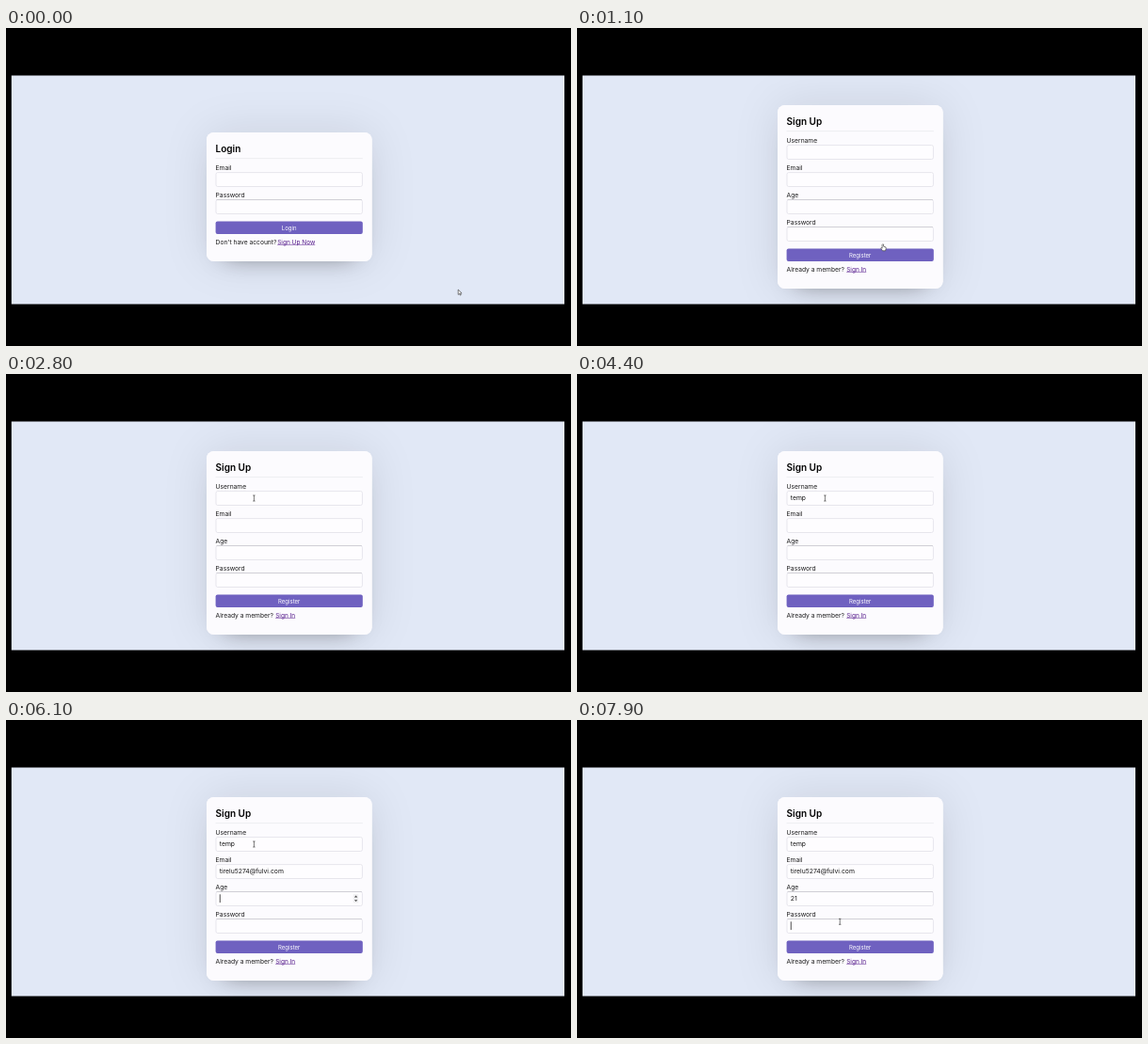
Write an HTML page with a canvas that moves like this. It is 600x338 px and loops after 8 s.

```html
<!DOCTYPE html>
<html lang="en">
<head>
<meta charset="utf-8">
<title>Sign up form</title>
<style>
  html, body { margin: 0; width: 100%; height: 100%; overflow: hidden; background: #000; }
  canvas { display: block; width: 600px; height: 338px; }
</style>
</head>
<body>
<canvas id="stage"></canvas>
<script>
const W = 600, H = 338, LOOP = 8000, TICK = 100;
const FONT = 'Inter, "Open Sans", sans-serif';
const LEFT = 222.6, INNER = 156.2, PITCH = 29;
const EMAIL = 'tirelu5274@fulvi.com';

const LOGIN = {
  top: 111, height: 137, title: 'Login', fields: ['Email', 'Password'],
  button: 'Login', note: "Don't have account?", link: 'Sign Up Now', linkX: 288.2, linkEnd: 327
};
const SIGNUP = {
  top: 82, height: 195, title: 'Sign Up', fields: ['Username', 'Email', 'Age', 'Password'],
  button: 'Register', note: 'Already a member?', link: 'Sign In', linkX: 286.2, linkEnd: 307
};

// Pointer stops: time, x, y of the hot spot
const PATH = [
  [0, 480.2, 278], [200, 391, 283], [400, 391, 283], [1000, 324.6, 229.8],
  [1200, 324.6, 229.8], [2100, 263.4, 132], [6900, 263.4, 132], [7700, 279.2, 214.3]
];

// Focus changes: time, field index
const FOCUS = [[2200, 0], [3900, 1], [5000, 2], [7700, 3]];
const CARET_OFF = [[2800, 3100], [3800, 3900], [4400, 4700], [5200, 5500], [5800, 6100], [6400, 6600], [7200, 7500]];

const canvas = document.getElementById('stage');
const ctx = canvas.getContext('2d');
const dpr = window.devicePixelRatio || 1;
canvas.width = W * dpr;
canvas.height = H * dpr;
ctx.scale(dpr, dpr);

const pageAt = t => t < 1100 ? LOGIN : SIGNUP;
const inputTop = (page, i) => page.top + 42.2 + PITCH * i;
const extra = page => PITCH * (page.fields.length - 2);
const typed = (text, t, start) =>
  text.slice(0, Math.max(0, Math.floor((t - start) / TICK) + 1));

function valuesAt(t) {
  const name = t < 3100 ? '' : typed('temp', t, 3000);
  return [name, t < 4700 ? '' : EMAIL, typed('21', t, 6600), ''];
}

function focusAt(t) {
  let field = -1;
  for (const [start, i] of FOCUS) if (t >= start) field = i;
  return field;
}

function pointerAt(t) {
  let i = PATH.length - 1;
  while (t < PATH[i][0]) i--;
  const a = PATH[i], b = PATH[i + 1] || a;
  const p = b === a ? 0 : (t - a[0]) / (b[0] - a[0]);
  const e = p * p * (3 - 2 * p);
  return { x: a[1] + (b[1] - a[1]) * e, y: a[2] + (b[2] - a[2]) * e };
}

function text(str, x, y, size, color, weight = 400, align = 'left') {
  ctx.font = `${weight} ${size}px ${FONT}`;
  ctx.fillStyle = color;
  ctx.textAlign = align;
  ctx.fillText(str, x, y);
}

function box(x, y, w, h, r, color) {
  ctx.beginPath();
  ctx.roundRect(x, y, w, h, r);
  ctx.fillStyle = color;
  ctx.fill();
}

function rect(x, y, w, h, color) {
  ctx.fillStyle = color;
  ctx.fillRect(x, y, w, h);
}

function shadow(page, spread, dy, blur, color) {
  ctx.save();
  ctx.shadowColor = color;
  ctx.shadowBlur = blur * dpr;
  ctx.shadowOffsetY = dy * dpr;
  box(213 + spread, page.top + spread, 175.6 - 2 * spread, page.height - 2 * spread, 7.8, '#fcfbfe');
  ctx.restore();
}

function drawInput(y) {
  ctx.beginPath();
  ctx.roundRect(LEFT + 0.4, y + 0.4, INNER - 0.8, 14.9, 1.8);
  ctx.fillStyle = '#fefdff';
  ctx.fill();
  ctx.lineWidth = 0.7;
  ctx.strokeStyle = '#dfdde5';
  ctx.stroke();
  if (y > 180) rect(LEFT + 1, y - 0.2, INNER - 2, 0.9, '#cfcdd4');
}

function drawSpinner(y) {
  rect(368.8, y + 3, 5.4, 9.2, '#efeff1');
  ctx.fillStyle = '#444';
  for (const s of [-1, 1]) {
    const mid = y + 7.6 + s * 1.4;
    ctx.beginPath();
    ctx.moveTo(369.9, mid);
    ctx.lineTo(373.3, mid);
    ctx.lineTo(371.6, mid + s * 1.9);
    ctx.fill();
  }
}

function drawCard(page, t) {
  shadow(page, 0, 0, 50, 'rgba(0,0,0,.1)');
  shadow(page, 18.7, 12.5, 25, 'rgba(0,0,0,.5)');
  box(213, page.top, 175.6, page.height, 7.8, '#fcfbfe');

  text(page.title, LEFT, page.top + 20.6, 10, '#000', 600);
  rect(LEFT, page.top + 27.5, INNER, 0.6, '#e4e3e8');

  const values = valuesAt(t);
  const focus = focusAt(t);
  page.fields.forEach((label, i) => {
    const y = inputTop(page, i);
    text(label, LEFT, y - 2.6, 6.7, '#1a1a1a');
    drawInput(y);
    if (page === LOGIN) return;
    text(values[i], 226.8, y + 9.8, 6.8, '#161616');
    if (i !== focus) return;
    if (label === 'Age') drawSpinner(y);
    if (!CARET_OFF.some(([a, b]) => t >= a && t < b)) {
      rect(226.8 + ctx.measureText(values[i]).width, y + 3.1, 0.8, 8.8, '#222');
    }
  });

  const shift = page.top + extra(page);
  box(LEFT, shift + 94.4, INNER, 13.6, 2, '#6f61c0');
  text(page.button, 300.7, shift + 103.5, 6, '#fff', 400, 'center');
  text(page.note, LEFT, shift + 118.5, 6.7, '#1a1a1a');
  text(page.link, page.linkX, shift + 118.5, 6.5, '#551a8b');
  rect(page.linkX, shift + 119.5, ctx.measureText(page.link).width, 0.5, '#551a8b');
}

function pointerKind(page, { x, y }) {
  const within = (x0, y0, x1, y1) => x >= x0 && x <= x1 && y >= y0 && y <= y1;
  const shift = page.top + extra(page);
  const right = LEFT + INNER;
  if (within(page.linkX, shift + 112, page.linkEnd, shift + 121)) return 'hand';
  if (within(LEFT, shift + 94.4, right, shift + 108)) return 'hand';
  const overInput = page.fields.some((_, i) => {
    const top = inputTop(page, i);
    return within(LEFT, top, right, top + 15.6);
  });
  return overInput ? 'beam' : 'arrow';
}

function outline(points) {
  ctx.beginPath();
  points.forEach(([x, y]) => ctx.lineTo(x, y));
  ctx.closePath();
  ctx.fillStyle = '#fff';
  ctx.fill();
  ctx.stroke();
}

const CURSORS = {
  arrow() {
    outline([[0, 0], [0, 5.4], [1.3, 4.3], [2.1, 6.1], [3, 5.7], [2.2, 4], [3.9, 3.9]]);
  },
  hand() {
    outline([[0, 0], [0.9, 0.2], [1.1, 2.5], [3.4, 3.2], [3.6, 4.6], [2.9, 7],
      [0, 7], [-2, 4.4], [-1.6, 3.7], [-0.5, 4.4], [-0.5, 0.5]]);
  },
  beam() {
    ctx.beginPath();
    ctx.moveTo(-1.2, -3);
    ctx.lineTo(1.2, -3);
    ctx.moveTo(0, -3);
    ctx.lineTo(0, 3);
    ctx.moveTo(-1.2, 3);
    ctx.lineTo(1.2, 3);
    ctx.stroke();
  }
};

function drawPointer(t) {
  const pos = pointerAt(t);
  // The hover shape updates one tick after the page changes
  const kind = pointerKind(pageAt(t - TICK), pos);
  ctx.save();
  ctx.translate(pos.x, pos.y);
  ctx.lineWidth = 0.7;
  ctx.lineJoin = 'round';
  ctx.strokeStyle = '#444';
  CURSORS[kind]();
  ctx.restore();
}

function draw(t) {
  rect(0, 0, W, H, '#000');
  ctx.save();
  ctx.beginPath();
  ctx.rect(5.8, 50.4, 587.2, 243.2);
  ctx.clip();
  rect(0, 0, W, H, '#e1e8f6');
  drawCard(pageAt(t), t);
  drawPointer(t);
  ctx.restore();
}

const start = performance.now();
function frame() {
  const t = (performance.now() - start) % LOOP;
  draw(Math.floor(t / TICK) * TICK);
  requestAnimationFrame(frame);
}
frame();
</script>
</body>
</html>
```
